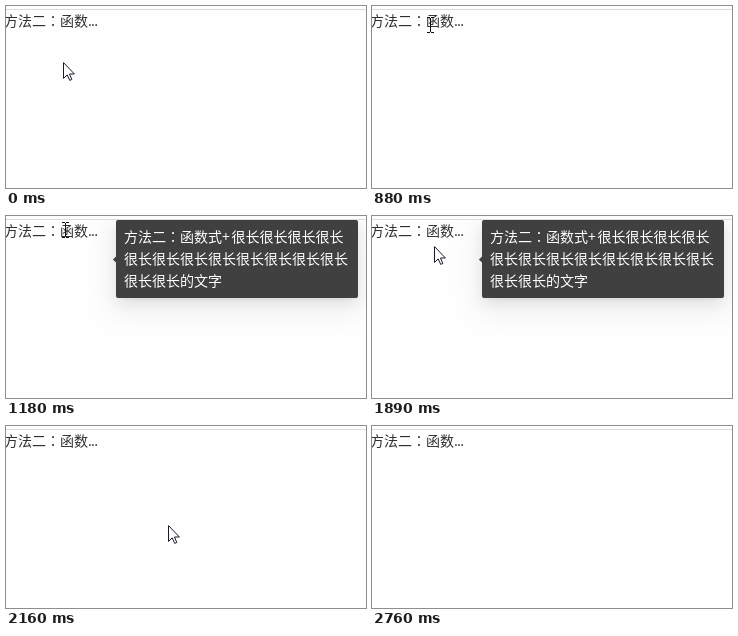
Animation of 360x182 px, one loop 2.91 s. Source, as an HTML page:

```html
<!DOCTYPE html>
<html lang="zh-CN">
<head>
<meta charset="utf-8">
<title>Tooltip</title>
<style>
html, body { margin: 0; width: 100%; height: 100%; overflow: hidden; background: #fefefe; }
body {
  position: relative;
  font: 14px/22px "Noto Sans CJK SC", "Noto Sans CJK", sans-serif;
  color: #303030;
  white-space: nowrap;
}
.rule { position: absolute; top: 3px; left: 0; right: 0; height: 1px; background: #dcdcdc; }
.cell { position: absolute; left: -2px; top: 3px; }
.colon { font-family: "Noto Sans CJK JP", "Noto Sans CJK SC", sans-serif; }
.dots { letter-spacing: -.8px; }
.plus { letter-spacing: 1.8px; }

.layer { position: absolute; top: 4px; left: 0; right: 0; bottom: 0; overflow: hidden; }
.tip {
  position: absolute; left: 110px; top: 0;
  box-sizing: border-box; width: 242px; height: 78px; padding: 5px 8px 7px;
  border-radius: 2px; background: #404040; color: #fff;
  transform-origin: -4px 50%;
  box-shadow: 0 3px 6px -4px rgba(0,0,0,.12), 0 6px 16px rgba(0,0,0,.08), 0 9px 28px 8px rgba(0,0,0,.05);
  animation: tip 2910ms step-end infinite;
}
.tip::before {
  content: ""; position: absolute; left: -2.5px; top: 36.5px;
  width: 5px; height: 5px; background: #404040; transform: rotate(45deg);
}
@keyframes tip {
  0%, 74.22% { opacity: 0; transform: none; }
  35.39%, 69.07% { opacity: .94; transform: scale(.992); }
  40.54% { opacity: 1; transform: none; }
}

.cursor { position: absolute; left: 0; top: 0; overflow: visible; }
.arrow { animation: arrow 2910ms step-end infinite; }
.beam { animation: beam 2910ms step-end infinite; }
@keyframes arrow {
  0% { transform: translate(57px, 56px); }
  12.71% { transform: translate(59px, 55px); }
  17.86% { transform: translate(60px, 51px); }
  21.99% { transform: translate(60px, 40px); }
  26.11% { transform: translate(59px, 28px); }
  30.24% { transform: translate(-40px, 0); }
  64.94% { transform: translate(62px, 30px); }
  69.07% { transform: translate(66px, 41px); }
  74.22% { transform: translate(162px, 99px); }
  79.38% { transform: translate(275px, 126px); }
  84.53% { transform: translate(288px, 151px); }
  89.69% { transform: translate(313px, 178px); }
  94.84% { transform: translate(-40px, 0); }
}
@keyframes beam {
  0%, 64.94% { transform: translate(-40px, 0); }
  30.24% { transform: translate(55px, 11px); }
  35.39% { transform: translate(56px, 6px); }
}
</style>
</head>
<body>
<div class="rule"></div>
<div class="cell">方法二<span class="colon" lang="ja">：</span>函数<span class="dots">...</span></div>
<div class="layer">
  <div class="tip">方法二<span class="colon" lang="ja">：</span>函数式<span class="plus">+</span>很长很长很长很长<br>很长很长很长很长很长很长很长很长<br>很长很长的文字</div>
</div>
<svg class="cursor beam" width="7" height="16" shape-rendering="crispEdges">
  <path d="M0 .5h3M4 .5h3M3.5 1v14M0 15.5h3M4 15.5h3" fill="none" stroke="#111"/>
</svg>
<svg class="cursor arrow" width="12" height="19">
  <path d="M.5 .6V16.4L4.2 12.9L6.7 18.4L8.8 17.5L6.5 12H11.4Z" fill="#fff" stroke="#1a1a26"/>
</svg>
</body>
</html>
```
